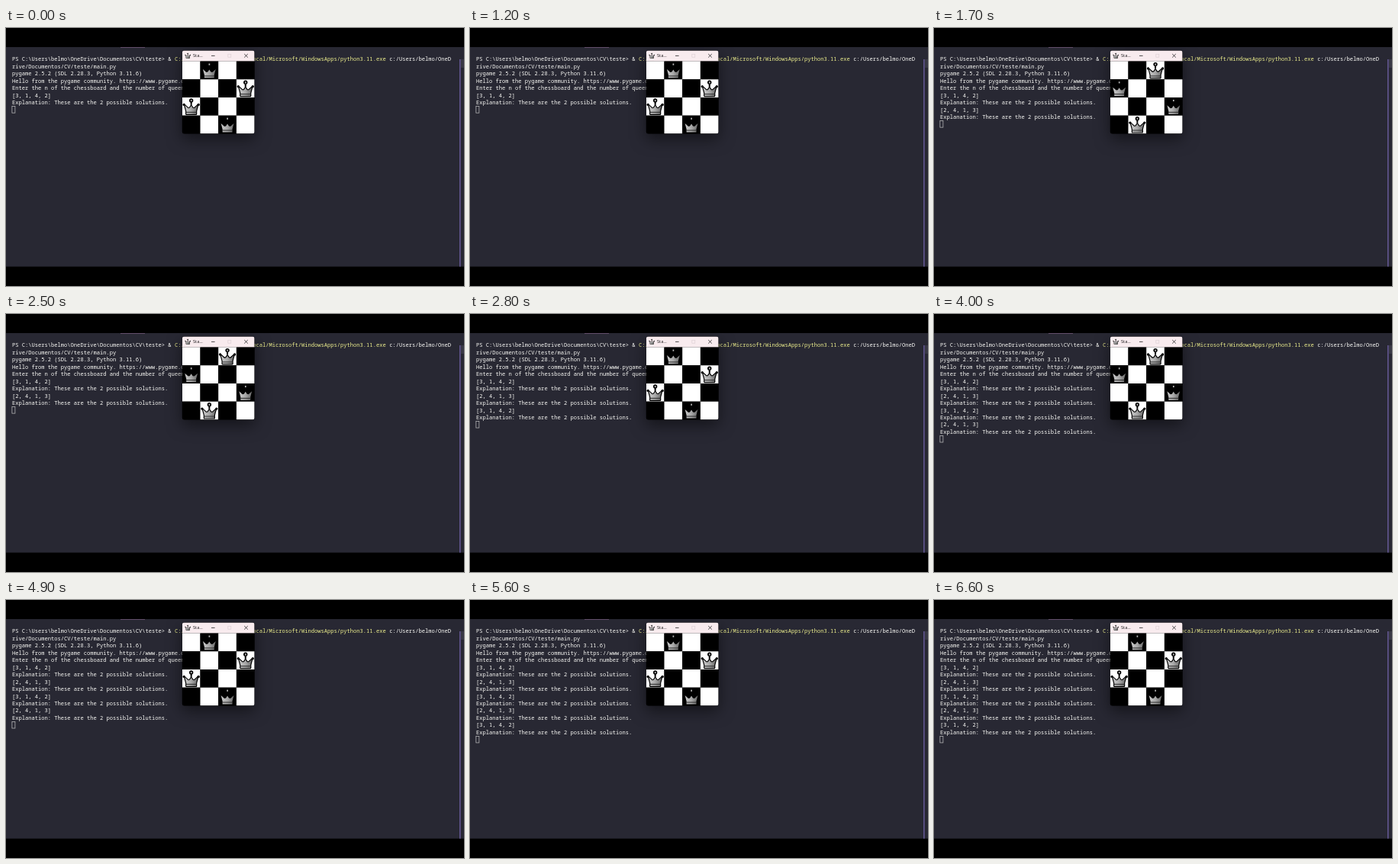
Animation, 600 px wide and 338 px high, one loop 6700 ms. Source, as an HTML page with a canvas:

```html
<!DOCTYPE html>
<html lang="en">
<head>
<meta charset="utf-8">
<title>Four queens in the terminal</title>
<style>
  html, body { margin: 0; width: 100%; height: 100%; overflow: hidden; background: #000; }
  canvas { display: block; width: 600px; height: 338px; }
</style>
</head>
<body>
<canvas id="stage"></canvas>
<script>
const W = 600, H = 338, LOOP = 6700;
const canvas = document.getElementById('stage');
const ratio = window.devicePixelRatio || 1;
canvas.width = W * ratio;
canvas.height = H * ratio;
const ctx = canvas.getContext('2d');
ctx.scale(ratio, ratio);

const MONO = '500 7.1px "Noto Sans Mono", monospace';
const CHAR = 4.26, LEFT = 8, BASE = 43.3, LINE = 9.47;
const INK = '#fafaf6', YELLOW = '#eef08e', PANEL = '#282833';

const SOLUTIONS = [[3, 1, 4, 2], [2, 4, 1, 3]];
// The board is redrawn a moment before its result is printed.
const BOARD_TIMES = [1650, 2750, 3820, 4870];
const PRINT_TIMES = [1690, 2780, 3850, 4950];

const PROMPT = 'PS C:\\Users\\belmo\\OneDrive\\Documentos\\CV\\teste> & ';
const COMMAND = 'C:/Users/belmo/AppData/Local/Microsoft/WindowsApps/python3.11.exe';
const INTRO = [
  'rive/Documentos/CV/teste/main.py',
  'pygame 2.5.2 (SDL 2.28.3, Python 3.11.6)',
  'Hello from the pygame community. https://www.pygame.org/contribute.html',
  'Enter the n of the chessboard and the number of queens: 4'
];

const passed = (times, t) => times.filter(time => t >= time).length;

function rect(x, y, w, h, color) {
  ctx.fillStyle = color;
  ctx.fillRect(x, y, w, h);
}

function disc(x, y, r, color) {
  ctx.beginPath();
  ctx.arc(x, y, r, 0, 2 * Math.PI);
  ctx.fillStyle = color;
  ctx.fill();
}

function write(text, column, row, color = INK) {
  ctx.font = MONO;
  ctx.fillStyle = color;
  ctx.fillText(text, LEFT + column * CHAR, BASE + row * LINE);
}

function path(points, closed) {
  ctx.beginPath();
  points.forEach(([x, y]) => ctx.lineTo(x, y));
  if (closed) ctx.closePath();
}

function line(color, width, ...points) {
  path(points, false);
  ctx.strokeStyle = color;
  ctx.lineWidth = width;
  ctx.stroke();
}

// The queen fills a 24 by 24 cell.
function queen(x, y, size) {
  ctx.save();
  ctx.translate(x, y);
  ctx.scale(size / 24, size / 24);
  disc(12, 4, 2.7, '#000');
  rect(11.2, 3, 1.7, 2.2, '#b8b8b8');
  rect(11, 6, 2, 4, '#000');
  disc(2.4, 9.5, 1.7, '#000');
  disc(21.6, 9.5, 1.7, '#000');

  const metal = ctx.createLinearGradient(4, 0, 20, 0);
  metal.addColorStop(0, '#cacaca');
  metal.addColorStop(0.5, '#a8a8a8');
  metal.addColorStop(1, '#6c6c6c');
  path([[3.5, 10.5], [8, 14.5], [10, 14], [12, 11], [14, 14], [16, 14.5],
    [20.5, 10.5], [18.5, 18], [18.5, 22], [5.5, 22], [5.5, 18]], true);
  ctx.lineJoin = 'round';
  ctx.strokeStyle = '#000';
  ctx.lineWidth = 2.4;
  ctx.stroke();
  ctx.fillStyle = metal;
  ctx.fill();
  line('#222', 1, [5, 19.6], [19, 19.6]);
  ctx.restore();
}

function terminal(count) {
  rect(0, 25, W, 287.6, PANEL);
  rect(150, 25, 32, 0.8, '#72597a');
  rect(594, 41, 1.6, 271.6, '#625690');
  rect(596, 41, 4, 11, '#393945');

  write(PROMPT, 0, 0);
  write(COMMAND, PROMPT.length, 0, YELLOW);
  write('c:/Users/belmo/OneD', PROMPT.length + COMMAND.length + 1, 0);
  INTRO.forEach((text, i) => write(text, 0, i + 1));
  for (let i = 0; i < count; i++) {
    write(`[${SOLUTIONS[i % 2].join(', ')}]`, 0, 5 + 2 * i);
    write('Explanation: These are the 2 possible solutions.', 0, 6 + 2 * i);
  }
  ctx.strokeStyle = '#c4c4c4';
  ctx.lineWidth = 0.7;
  ctx.strokeRect(7.9, 102.6 + (count - 1) * 2 * LINE, 4, 8.6);
}

function chessWindow(rows) {
  const x = 230.8, y = 29.4, w = 94.8, top = 43.6, cell = w / 4, h = top + w - y;
  ctx.save();
  ctx.shadowColor = 'rgba(0,0,0,.5)';
  ctx.shadowBlur = 20 * ratio;
  ctx.shadowOffsetY = 7 * ratio;
  ctx.beginPath();
  ctx.roundRect(x, y, w, h, 3);
  ctx.fillStyle = '#000';
  ctx.fill();
  ctx.restore();

  ctx.save();
  ctx.beginPath();
  ctx.roundRect(x, y, w, h, 3);
  ctx.clip();
  rect(x, y, w, top - y, '#f8ebee');
  for (let i = 0; i < 16; i++) {
    const col = i % 4, row = i >> 2;
    rect(x + col * cell, top + row * cell, cell, cell, (col + row) % 2 ? '#000' : '#fff');
  }
  rows.forEach((row, col) => queen(x + col * cell, top + (row - 1) * cell, cell));
  ctx.restore();

  queen(234.2, 32.2, 8);
  ctx.font = '5.7px "Open Sans", sans-serif';
  ctx.fillStyle = '#171417';
  ctx.fillText('Sta...', 245, 38.4);
  line('#222', 0.8, [269, 36.4], [273.6, 36.4]);
  ctx.strokeStyle = '#dacdd1';
  ctx.lineWidth = 0.6;
  ctx.strokeRect(290.8, 34.2, 4, 4);
  line('#222', 0.8, [312.2, 34], [316.8, 38.6]);
  line('#222', 0.8, [316.8, 34], [312.2, 38.6]);
}

function draw(t) {
  rect(0, 0, W, H, '#000');
  terminal(1 + passed(PRINT_TIMES, t));
  chessWindow(SOLUTIONS[passed(BOARD_TIMES, t) % 2]);
}

const start = performance.now();
function tick() {
  draw((performance.now() - start) % LOOP);
  requestAnimationFrame(tick);
}
tick();
</script>
</body>
</html>
```
